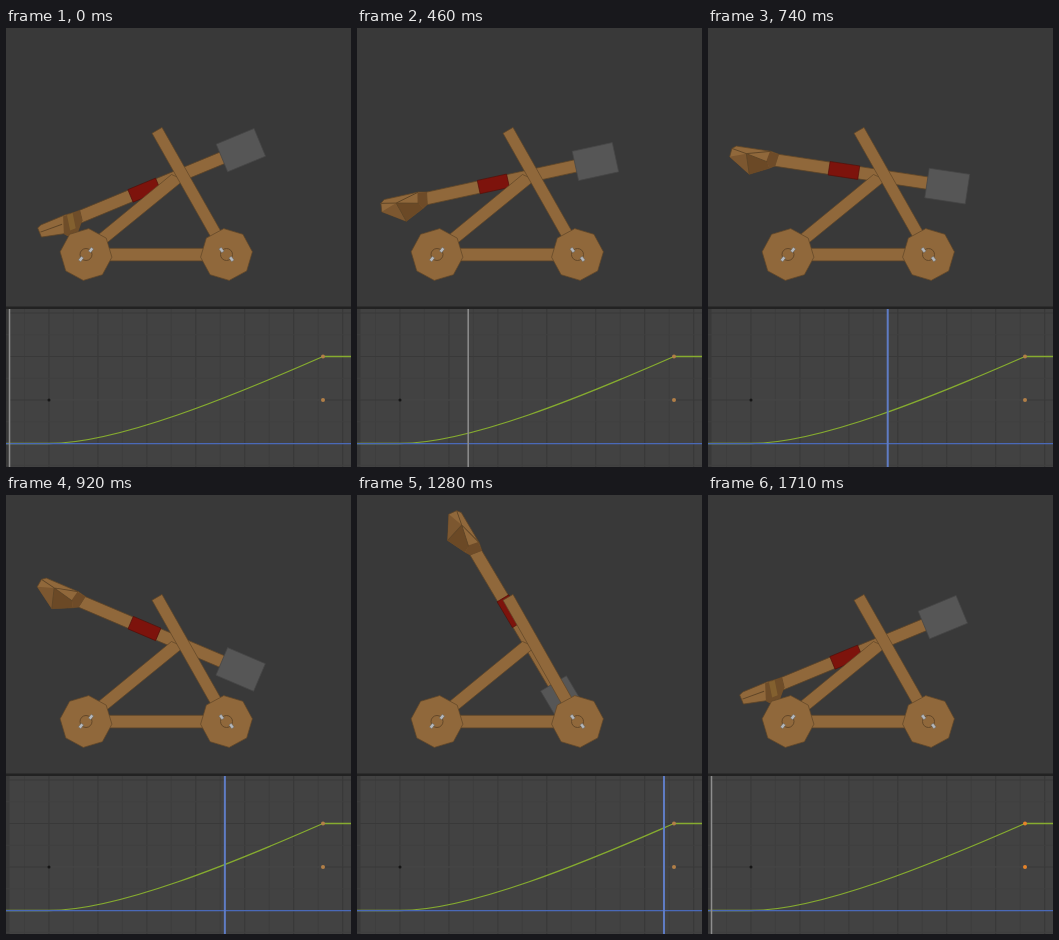
An HTML page for the animation above (1.76 s loop, 345 by 439 pixels).

```html
<!DOCTYPE html>
<html lang="en">
<head>
<meta charset="utf-8">
<title>Catapult</title>
<style>
  html, body { margin: 0; width: 100%; height: 100%; overflow: hidden; background: #393939; }
  svg { display: block; width: 345px; height: 439px; }
  .wood { fill: #90683b; stroke: #5f4527; stroke-width: .7; stroke-linejoin: round; }
  .hub { fill: none; stroke: #5f4527; stroke-width: .9; }
  .bolt { fill: #b4b8bd; stroke: #5d5a55; stroke-width: .4; }
</style>
</head>
<body>
<svg viewBox="0 0 345 439">
  <rect width="345" height="439" fill="#393939"/>

  <g id="arm">
    <rect class="wood" x="-112" y="-6.2" width="162" height="12.4"/>
    <rect x="-52" y="-6.8" width="30" height="13.6" fill="#7d130c" stroke="#4f0d08" stroke-width=".6"/>
    <rect x="47" y="-15" width="41" height="30" fill="#565656" stroke="#464646" stroke-width=".7"/>
    <g id="cup">
      <path class="wood" d="M-151-5L-147-8L-112-8L-104-6.3L-106 6L-111 9L-130 18L-152 3.5Z"/>
      <path fill="#7c5730" d="M-152 3.5L-136-2L-130 18Z"/>
      <path fill="#6b4926" d="M-136-2L-114 3L-111 9L-130 18Z"/>
      <path fill="#6e4b28" d="M-113-7.6L-104-6.3L-106 6L-111 9L-115 2Z"/>
      <path class="hub" stroke-width=".5" d="M-151-5L-136-2L-112-8M-136-2L-130 18M-136-2L-114 3"/>
    </g>
    <g id="rest">
      <path class="wood" d="M-150-5.8L-146-7.5L-120-7.5L-104.5-5.6L-106 4L-118 17L-122 17L-128 9.5L-150 4Z"/>
      <path fill="#6f4d29" d="M-122-7L-104.5-5.6L-106 4L-118 17L-122 17L-128 9.5Z"/>
      <path fill="#83602f" d="M-118-6.5L-112-6L-115 9L-121 9Z"/>
      <path class="hub" d="M-149-1L-126 0"/>
    </g>
  </g>

  <rect class="wood" x="80" y="220.3" width="140" height="12.6"/>
  <path class="wood" d="M76 220L165.5 146.5L178 152L86 227Z"/>
  <path class="wood" d="M146 105.2L156 99.4L217 207L207 213Z"/>
  <g id="wheels"></g>

  <rect y="278.5" width="345" height="2.5" fill="#222"/>
  <rect y="281" width="345" height="158" fill="#424242"/>
  <rect y="281" width="3.5" height="158" fill="#393939"/>
  <g id="grid" fill="none"></g>
  <path d="M43 372H317" stroke="#4b4b4b"/>
  <path id="curve" fill="none" stroke="#86ac2f" stroke-width="1.3"/>
  <path d="M0 415.7H345" stroke="#4a69b8" stroke-width="1.3"/>
  <rect id="head" y="281" height="158"/>
  <circle cx="43" cy="372" r="1.5" fill="#161616"/>
  <g id="keys"><circle cx="317" cy="328.5" r="2"/><circle cx="317" cy="372" r="2"/></g>
</svg>
<script>
const $ = id => document.getElementById(id);
const NS = 'http://www.w3.org/2000/svg';
function add(parent, tag, attrs) {
  const el = document.createElementNS(NS, tag);
  for (const k in attrs) el.setAttribute(k, attrs[k]);
  parent.append(el);
  return el;
}

function wheel(cx, side) {
  const g = add($('wheels'), 'g', { transform: `translate(${cx} 226.5) scale(${side} 1)` });
  const pts = Array.from({ length: 8 }, (_, i) => {
    const a = (6 + 45 * i) * Math.PI / 180;
    return [26 * Math.cos(a), 26 * Math.sin(a)].map(v => v.toFixed(1)).join();
  });
  add(g, 'polygon', { class: 'wood', points: pts.join(' ') });
  add(g, 'circle', { class: 'hub', r: 6 });
  for (const s of [-1, 1])
    add(g, 'rect', { class: 'bolt', x: -1.5, y: -2.3, width: 3, height: 4.6,
      transform: `translate(${5 * s} ${-4.5 * s}) rotate(38)` });
}
wheel(80, 1);
wheel(220.5, -1);

// Timeline grid: strong lines every five frames, faint ones between
const STEP = 9.79, LEFT = 3.5;
for (let i = 0; i < 14; i++)
  add($('grid'), 'path', { d: `M${18.5 + i * STEP * 2.5} 281V439`, stroke: i % 2 ? '#383838' : '#3e3e3e' });
for (let i = 0; i < 8; i++)
  add($('grid'), 'path', { d: `M0 ${285 + i * 21.75}H345`, stroke: i % 2 ? '#3f3f3f' : '#393939' });

const [X1, X2, Y2] = [.25, .667, .54];
const bez = (a, b, u) => 3 * (1 - u) ** 2 * u * a + 3 * (1 - u) * u * u * b + u ** 3;
function ease(x) {
  if (x <= 0 || x >= 1) return x <= 0 ? 0 : 1;
  let lo = 0, hi = 1;
  for (let i = 0; i < 24; i++) {
    const mid = (lo + hi) / 2;
    if (bez(X1, X2, mid) < x) lo = mid; else hi = mid;
  }
  return bez(0, Y2, lo);
}
const cx = f => 43 + 274 * f, cy = f => 415.5 - 87 * f;
$('curve').setAttribute('d',
  `M0 415.5H43C${cx(X1)} 415.5 ${cx(X2)} ${cy(Y2)} 317 328.5H345`);

// Moments at which the held picture changes
const LOOP = 1760;
const TIMES = [0, 50, 80, 130, 210, 250, 300, 340, 380, 420, 460, 540,
  590, 670, 710, 740, 820, 870, 920, 970, 1000, 1050, 1100,
  1150, 1230, 1280, 1320, 1360, 1400, 1480, 1660];

function draw(ms) {
  const held = TIMES.findLast(t => t <= ms);
  const n = Math.floor(held * .024 + .49) % 40;
  const angle = -22.5 + 86 * ease((n - 4) / 28);
  $('arm').setAttribute('transform', `translate(172.5 148) rotate(${angle})`);
  $('cup').setAttribute('display', n > 4 ? 'inline' : 'none');
  $('rest').setAttribute('display', n > 4 ? 'none' : 'inline');

  const blue = n > 13, w = blue ? 2 : 1.5;
  $('head').setAttribute('x', LEFT + n * STEP - w / 2);
  $('head').setAttribute('width', w);
  $('head').setAttribute('fill', blue ? '#5f7cc4' : '#8e8e8e');
  $('keys').setAttribute('fill', held >= 1480 ? '#e5832a' : '#b17f47');
}

const start = performance.now();
function tick() {
  draw((performance.now() - start) % LOOP);
  requestAnimationFrame(tick);
}
tick();
</script>
</body>
</html>
```
